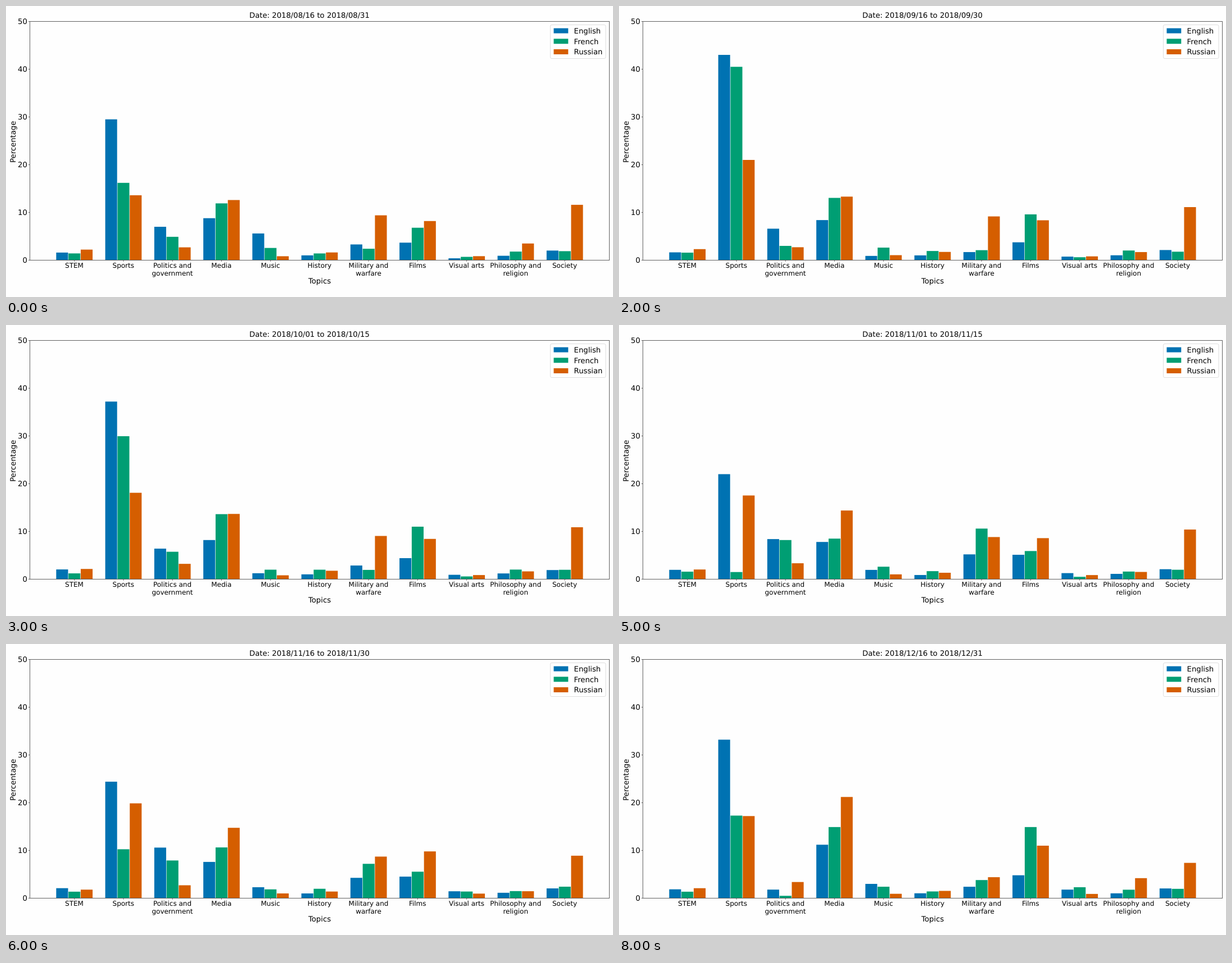
Write an HTML page that moves like this. It is 1080 px wide and 518 px high and loops after 9 s.

```html
<!DOCTYPE html>
<html lang="en">
<head>
<meta charset="utf-8">
<title>Topics by language</title>
<style>
  html, body { margin: 0; width: 100%; height: 100%; overflow: hidden; background: #fefefe; }
  svg { display: block; width: 100%; height: 100%; font: 13.2px "DejaVu Sans", sans-serif; }
  text { text-rendering: geometricPrecision; }
  .axis { fill: none; stroke: #606060; }
</style>
</head>
<body>
<svg id="chart" viewBox="0 0 1080 518"></svg>
<script>
const chart = document.getElementById('chart');
const STEP_MS = 1000, STEPS = 9;
const BASE = 452.5, LEFT = 42.5, RIGHT = 1073.5, TOP = 27.5, UNIT = (BASE - TOP) / 50;
const FIRST = 121.7, PITCH = 87.25, BAR = PITCH / 4;

const languages = { English: '#0072b2', French: '#009e73', Russian: '#d55e00' };

// One level per language: a typical percentage that wobbles,
// or key points { step: percentage } joined by straight lines.
const topics = {
  'STEM': [2, 1.4, 2.1],
  'Sports': [
    { 0: 29.5, 2: 43, 4: 31.4, 5: 22, 7: 26.8, 8: 33.2 },
    { 0: 16.2, 2: 40.5, 4: 19.4, 5: 1.5, 7: 19, 8: 17.3 },
    { 0: 13.6, 2: 21, 4: 15.2, 7: 22.2, 8: 17.2 }
  ],
  'Politics and|government': [
    { 0: 7, 4: 6.2, 7: 12.8, 8: 1.8 }, { 0: 4.9, 2: 3, 4: 8.5, 7: 7.6, 8: 0.5 }, 3.1
  ],
  'Media': [
    { 0: 8.8, 7: 7.4, 8: 11.2 }, { 0: 11.9, 4: 14.2, 5: 8.5, 8: 14.9 }, { 0: 12.6, 7: 15.1, 8: 21.2 }
  ],
  'Music': [{ 0: 5.6, 2: 0.9, 8: 3 }, 2.2, 0.9],
  'History': [0.9, 1.7, 1.5],
  'Military and|warfare': [
    { 0: 3.3, 2: 1.7, 5: 5.2, 8: 2.4 }, { 0: 2.4, 4: 1.8, 5: 10.6, 7: 3.8 }, { 0: 9.4, 7: 8.6, 8: 4.4 }
  ],
  'Films': [4.3, { 0: 6.8, 4: 12.4, 5: 5.9, 7: 5.2, 8: 14.9 }, { 0: 8.2, 5: 8.6, 7: 11 }],
  'Visual arts': [{ 0: 0.4, 8: 1.8 }, { 0: 0.7, 5: 0.5, 7: 2.3 }, 0.9],
  'Philosophy and|religion': [1.1, 1.7, { 0: 3.5, 2: 1.7, 7: 1.4, 8: 4.2 }],
  'Society': [2.1, 2.1, { 0: 11.6, 5: 10.4, 7: 7.4 }]
};

function wobble(seed) {
  const x = Math.sin(seed * 12.9898) * 43758.5453;
  return 0.4 * (x - Math.floor(x)) - 0.2;
}

function levelAt(level, step, seed) {
  if (typeof level === 'number') return level * (1 + wobble(seed * STEPS + step));
  const keys = Object.keys(level).map(Number);
  const from = keys.findLast(key => key <= step);
  const to = keys.find(key => key > step) ?? from;
  const part = to > from ? (step - from) / (to - from) : 0;
  return level[from] + (level[to] - level[from]) * part;
}

// Half-month periods, starting with the second half of August.
function periodAt(step) {
  const half = step + 1, month = 8 + Math.floor(half / 2);
  const last = half % 2 ? new Date(2018, month, 0).getDate() : 15;
  const date = day => `2018/${String(month).padStart(2, '0')}/${String(day).padStart(2, '0')}`;
  return `Date: ${date(half % 2 ? 16 : 1)} to ${date(last)}`;
}

function add(tag, attrs, text) {
  const node = document.createElementNS('http://www.w3.org/2000/svg', tag);
  for (const key in attrs) node.setAttribute(key, attrs[key]);
  if (text) node.textContent = text;
  return chart.appendChild(node);
}

const label = (x, y, text, anchor = 'middle', more = {}) =>
  add('text', { x, y, 'text-anchor': anchor, ...more }, text);

const title = label(540, 20.6, '');
const bars = Object.values(topics).flatMap((levels, i) => levels.map((level, s) => ({
  level,
  seed: i * 3 + s,
  rect: add('rect', {
    x: FIRST + i * PITCH + (s - 1.5) * BAR + 0.35, width: BAR - 0.7,
    fill: Object.values(languages)[s]
  })
})));

add('rect', { class: 'axis', x: LEFT, y: TOP, width: RIGHT - LEFT, height: BASE - TOP });
for (let value = 0; value <= 50; value += 10) {
  const y = BASE - value * UNIT;
  add('path', { class: 'axis', d: `M${LEFT} ${y}h-2.4` });
  label(37.9, y + 4.8, String(value), 'end');
}
Object.keys(topics).forEach((topic, i) => {
  const x = FIRST + i * PITCH;
  add('path', { class: 'axis', d: `M${x} ${BASE}v2.4` });
  topic.split('|').forEach((line, n) =>
    label(x - 0.2, 466.2 + n * 13.4, line, 'middle', { 'font-size': 12 }));
});
label(558, 493.6, 'Topics');
label(0, 0, 'Percentage', 'middle', { transform: 'translate(17 241.8) rotate(-90)' });

add('rect', { x: 968.5, y: 33.5, width: 98.5, height: 60, rx: 2.6, fill: '#fff', stroke: '#ddd' });
Object.entries(languages).forEach(([name, color], s) => {
  const y = 39.6 + s * 18.7;
  add('rect', { x: 974.5, y, width: 25.8, height: 9, fill: color });
  label(1010.6, y + 9.2, name, 'start');
});

let shown = -1;
function draw() {
  const step = Math.floor(performance.now() / STEP_MS) % STEPS;
  if (step !== shown) {
    shown = step;
    title.textContent = periodAt(step);
    for (const { level, seed, rect } of bars) {
      const height = levelAt(level, step, seed) * UNIT;
      rect.setAttribute('y', BASE - height);
      rect.setAttribute('height', height);
    }
  }
  requestAnimationFrame(draw);
}
draw();
</script>
</body>
</html>
```
